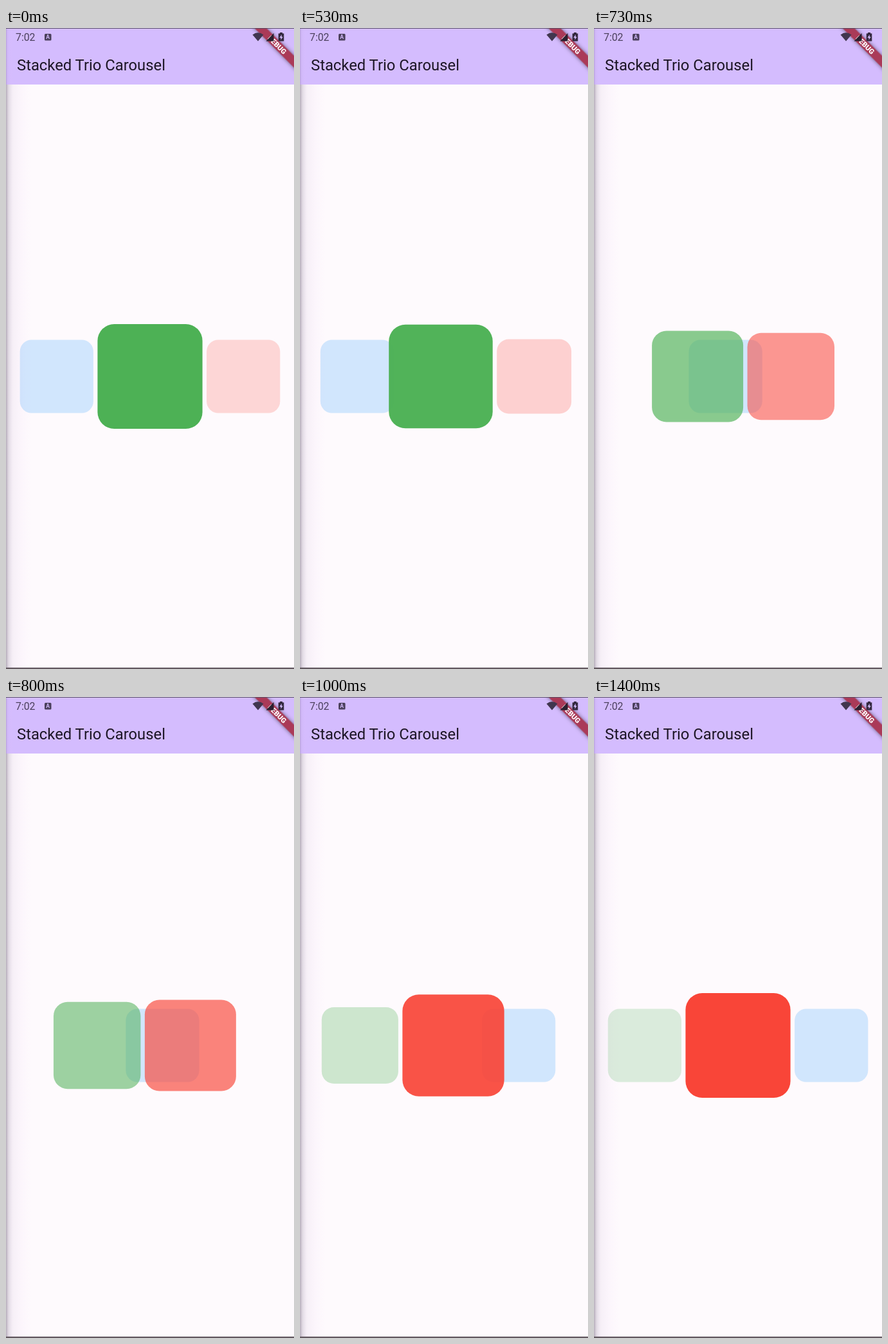
Write an HTML page that moves like this. It is 448 px wide and 998 px high and loops after 1.43 s.

```html
<!DOCTYPE html>
<html lang="en">
<head>
<meta charset="utf-8">
<title>Stacked Trio Carousel</title>
<style>
  html, body { margin: 0; width: 100%; height: 100%; overflow: hidden; background: #fefafd; }
  svg { display: block; width: 448px; height: 998px; font-family: Roboto, sans-serif; }
  .band { filter: drop-shadow(0 0 3px rgba(0, 0, 0, .5)); }
</style>
</head>
<body>
<svg viewBox="0 0 448 998">
  <defs>
    <linearGradient id="edge">
      <stop offset="0" stop-color="#50405c" stop-opacity=".42"/>
      <stop offset=".1" stop-color="#705c80" stop-opacity=".2"/>
      <stop offset=".27" stop-color="#b090c0" stop-opacity=".1"/>
      <stop offset=".6" stop-color="#e0b8ec" stop-opacity=".07"/>
      <stop offset="1" stop-color="#f0d0f8" stop-opacity="0"/>
    </linearGradient>
  </defs>

  <rect width="448" height="998" fill="#fefafd"/>
  <rect y="88" width="40" height="908" fill="url(#edge)"/>
  <g id="cards"></g>

  <rect width="448" height="88" fill="#d4bcfe"/>
  <rect width="12" height="88" fill="url(#edge)" opacity=".6"/>
  <text x="17" y="65.8" font-size="23.8" fill="#1d1626">Stacked Trio Carousel</text>

  <g transform="translate(448 0) rotate(45)">
    <rect class="band" x="-60" y="30.5" width="120" height="13.1" fill="#aa3a58"/>
    <text y="41" font-size="11.1" font-weight="900" fill="#fff" text-anchor="middle">DEBUG</text>
  </g>

  <g fill="#4b405c">
    <text x="15" y="20.3" font-size="15.8">7:02</text>
    <rect x="60" y="9" width="10.5" height="10.5" rx="1.5"/>
    <text x="65.2" y="17.4" font-size="8.5" font-weight="700" text-anchor="middle" style="fill:#d4bcfe">A</text>
    <path d="M383.5 10.5Q392 4 400.5 10.5L392 20.5Z" fill="#41364f"/>
    <path d="M404.5 20.5L416.5 8V20.5Z" fill="#2b2030"/>
    <path d="M426 7h4v1.6h2.3v11.9h-8.6V8.600H426Z" fill="#33283f"/>
    <path d="M428.700 10.300L425.400 15.200H427.600V18.600L430.700 13.700H428.700Z" fill="#d4bcfe"/>
  </g>

  <rect width="448" height="1" fill="#5d5368"/>
  <rect y="995.800" width="448" height="2.200" fill="#62585f"/>
</svg>
<script>
const LOOP = 1430, MID_X = 224, MID_Y = 542.5, REACH = 145.2, SIZE = 163.2;

// time in ms, progress of the swipe
const SWIPE = [[510, 0], [533, .034], [667, .3], [800, .567], [933, .797], [1000, .9], [1060, 1]];

const group = document.getElementById('cards');
const makeCard = color => {
  const card = document.createElementNS('http://www.w3.org/2000/svg', 'rect');
  card.setAttribute('fill', color);
  return group.appendChild(card);
};
const [blue, red, green] = ['#2196f8', '#f94538', '#4db155'].map(makeCard);

function swipeAt(t) {
  if (t <= SWIPE[0][0]) return 0;
  const i = SWIPE.findIndex(([time]) => time >= t);
  if (i < 0) return 1;
  const [t0, p0] = SWIPE[i - 1], [t1, p1] = SWIPE[i];
  return p0 + (p1 - p0) * (t - t0) / (t1 - t0);
}

// slot runs from -1 (left) through 0 (front) to 1 (right)
function place(card, slot, front) {
  const size = SIZE * (.7 + .3 * front);
  const attrs = {
    x: MID_X + slot * REACH - size / 2,
    y: MID_Y - size / 2,
    width: size,
    height: size,
    rx: size * .16,
    opacity: .2 + .8 * front
  };
  for (const key in attrs) card.setAttribute(key, attrs[key]);
}

// 30 fps held in steps of 30, 30 and 40 ms
function stepTime(t) {
  const n = Math.floor(t / 100) * 3 + Math.min(2, Math.floor(t % 100 / 30));
  return n * 100 / 3;
}

function draw(now) {
  const p = swipeAt(stepTime(now % LOOP));
  place(blue, 2 * p - 1, 0);
  place(red, 1 - p, p);
  place(green, -p, 1 - p);
}

let start;
function tick(now) {
  start ??= now;
  draw(now - start);
  requestAnimationFrame(tick);
}
draw(0);
requestAnimationFrame(tick);
</script>
</body>
</html>
```
